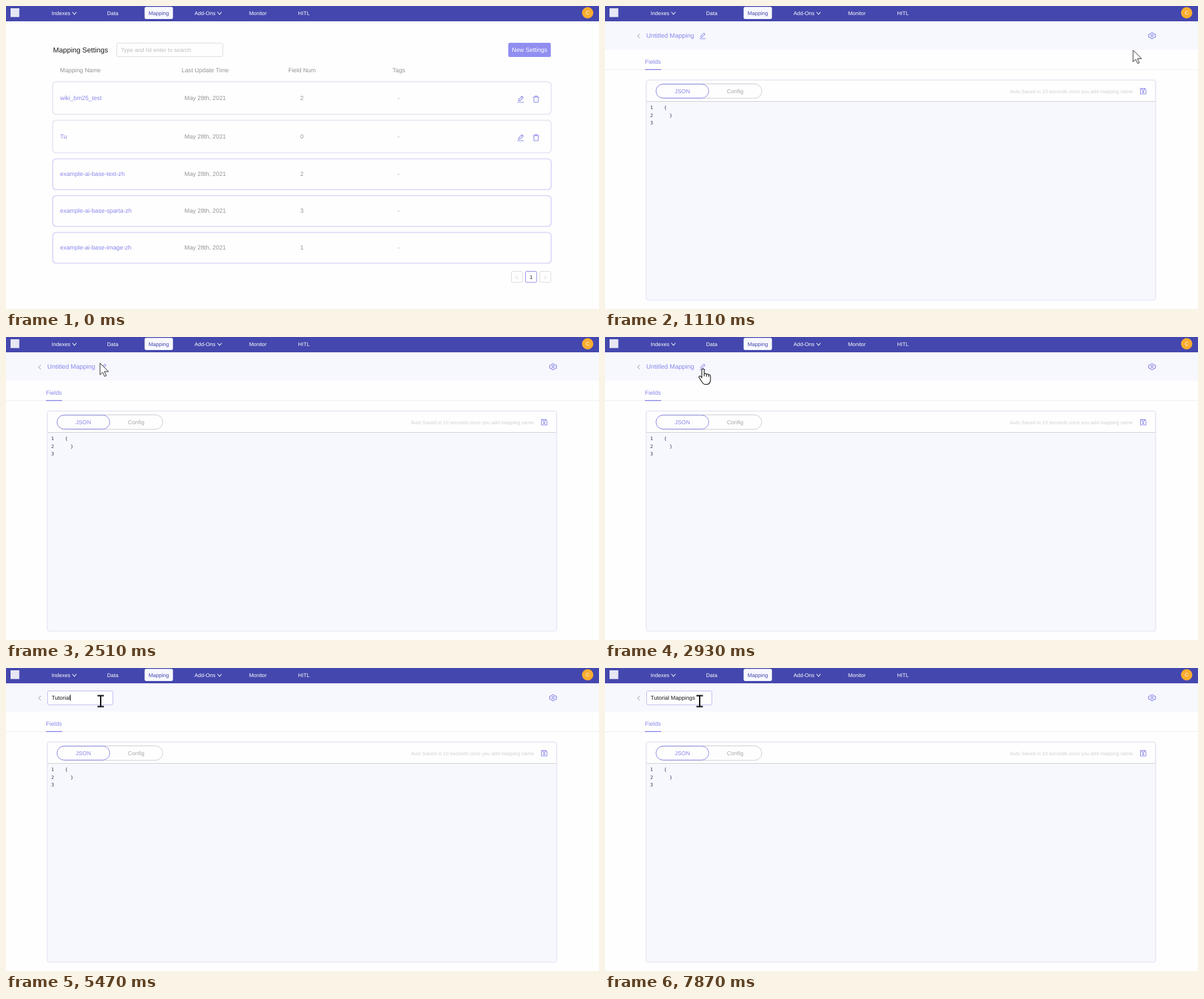
Write an HTML page that moves like this. It is 1046 by 535 pixels and loops after 8000 ms.

```html
<!DOCTYPE html>
<html lang="en">
<head>
<meta charset="utf-8">
<title>Mapping settings</title>
<style>
html, body { margin: 0; width: 100%; height: 100%; overflow: hidden; background: #fefefe; }
svg { display: block; width: 1046px; height: 535px; }
text { font: 10.62px "Liberation Sans", Arial, sans-serif; text-rendering: geometricPrecision; fill: #949494; }
.nav text { font-size: 9.4px; fill: #fff; }
.nav .on { fill: #4447ad; }
.link { fill: #8986ea; }
.ink { fill: #1c1c1c; }
.code text { font: 8.2px "DejaVu Sans Mono", monospace; fill: #33335c; }
.line { fill: none; stroke: #8481e6; stroke-width: 1.1; stroke-linejoin: round; stroke-linecap: round; }
.card { fill: #fefefe; stroke: #cbc9f8; stroke-width: 1.2; }
.card.soft { stroke: #e0e0ee; }
.box { fill: #fefefe; stroke: #d9d9d9; }

/* 80 ms is one percent */
#list, #edit, #title, #field, #button, #arrow, #hand, #beam { animation: 8s step-end infinite; }
#list { animation-name: list; }
#edit { animation-name: edit; }
#title { animation-name: title; }
#field { animation-name: field; }
#button { animation-name: hover; }
#arrow { animation-name: arrow; }
#hand { animation-name: hand; }
#beam { animation-name: beam; }
#cursor { animation: move 8s linear infinite; }
@keyframes list { 0% { visibility: visible } 13.125%, 100% { visibility: hidden } }
@keyframes edit { 0% { visibility: hidden } 13.125%, 100% { visibility: visible } }
@keyframes title { 0% { visibility: hidden } 13.125% { visibility: visible } 39.125%, 100% { visibility: hidden } }
@keyframes field { 0% { visibility: hidden } 39.125%, 100% { visibility: visible } }
@keyframes hover { 0% { fill: #918ef1 } 8.875%, 100% { fill: #9e9bf6 } }
@keyframes arrow {
  0% { visibility: hidden } 2.375% { visibility: visible } 8.875% { visibility: hidden }
  13.125% { visibility: visible } 33.125%, 100% { visibility: hidden }
}
@keyframes hand {
  0% { visibility: hidden } 8.875% { visibility: visible } 13.125% { visibility: hidden }
  33.125% { visibility: visible } 39.125%, 100% { visibility: hidden }
}
@keyframes beam { 0% { visibility: hidden } 39.125%, 100% { visibility: visible } }
@keyframes move {
  0%, 2.375% { transform: translate(1036px, 418px) }
  5% { transform: translate(996px, 200px) }
  7.5% { transform: translate(955px, 59px) }
  10.5%, 14.5% { transform: translate(931.5px, 78px) }
  16% { transform: translate(840px, 81px) }
  18.5% { transform: translate(520px, 84px) }
  21.25% { transform: translate(224.5px, 79.5px) }
  23%, 27.2% { transform: translate(166px, 60px) }
  28.875%, 30.6% { transform: translate(157px, 55px) }
  32.2% { transform: translate(175px, 37px) }
  34.875% { transform: translate(173px, 53px) }
  36.625%, 39.1% { transform: translate(173px, 56px) }
  41.25% { transform: translate(170px, 48px) }
  44.25%, 100% { transform: translate(167px, 58.5px) }
}
</style>
</head>
<body>
<svg viewBox="0 0 1046 535">
  <defs>
    <g id="pencil" class="line">
      <path d="M.5 11.5H11M2 9l.4-2.6L8 .8l2.2 2.2-5.6 5.6z"/>
    </g>
    <g id="trash" class="line">
      <path d="M.3 2.5h10.4M3.5 2.3V.6h4v1.7M1.5 2.7l.4 8.8h7.2l.4-8.8"/>
    </g>
    <path id="down" d="M0 0l3.7 4.4L7.4 0" fill="none" stroke="#fff" stroke-width="1.1"/>
    <filter id="glow" x="-2%" y="-15%" width="104%" height="130%">
      <feDropShadow dx="0" dy="0" stdDeviation="1.2" flood-color="#8481e6" flood-opacity=".22"/>
    </filter>
  </defs>

  <rect width="1046" height="535" fill="#fefefe"/>
  <g class="nav">
    <rect width="1046" height="27" fill="#4447ad"/>
    <rect x="8" y="4" width="15.5" height="15.5" fill="#e6e6f5"/>
    <rect x="244.5" y="1.5" width="50" height="21.5" rx="3" fill="#f7f8fe"/>
    <text x="80.5" y="16">Indexes</text><use href="#down" x="117" y="10.5"/>
    <text x="178.3" y="16">Data</text>
    <text x="251.5" y="16" class="on">Mapping</text>
    <text x="332.5" y="16">Add-Ons</text><use href="#down" x="373" y="10.5"/>
    <text x="428.7" y="16">Monitor</text>
    <text x="515.3" y="16">HITL</text>
    <circle cx="1026" cy="12" r="10" fill="#fbad2f"/>
    <text x="1026" y="15.2" text-anchor="middle" style="font-size:9px">C</text>
  </g>

  <g id="list">
    <text x="83" y="81.5" class="ink" style="font-size:12.55px">Mapping Settings</text>
    <rect class="box" x="195.5" y="65.5" width="187" height="24" rx="2"/>
    <text x="202.8" y="81" style="font-size:9.97px;fill:#bdbdbd">Type and hit enter to search</text>
    <rect id="button" x="886" y="65" width="75" height="25" rx="2.5"/>
    <text x="923.5" y="80.8" text-anchor="middle" style="fill:#fff">New Settings</text>
    <text x="95.3" y="117">Mapping Name</text>
    <text x="309.8" y="117">Last Update Time</text>
    <text x="498" y="117">Field Num</text>
    <text x="681.7" y="117">Tags</text>
    <g id="rows"></g>
    <rect class="box" x="891.5" y="468.5" width="19.5" height="19.5" rx="2"/>
    <rect class="box" x="916.5" y="468.5" width="19.5" height="19.5" rx="2" style="stroke:#8481e6"/>
    <rect class="box" x="941.5" y="468.5" width="19.5" height="19.5" rx="2"/>
    <path d="M903 477l-4 2.6 4 2.6M949.300 477l4 2.6-4 2.6" fill="none" stroke="#d2d2d2" stroke-width=".9"/>
    <text x="926.2" y="481.700" text-anchor="middle" class="ink" style="font-size:9px">1</text>
  </g>

  <g id="edit">
    <rect y="27" width="1046" height="50" fill="#f7f8fe"/>
    <path d="M61.500 49.500l-4.300 3.700 4.300 3.700" fill="none" stroke="#8c8c9c"/>
    <g id="title">
      <text x="72.800" y="56.200" class="link" style="font-size:11.260px">Untitled Mapping</text>
      <use href="#pencil" transform="translate(167 47) scale(.93)"/>
    </g>
    <g class="line" transform="translate(965 52.500)">
      <path d="M-1.500-5.300h3l.6 1.600 1.300.7 1.700-.3 1.300 2.200L5.200 0l1.200 1.100-1.300 2.200-1.700-.3-1.300.7-.6 1.600h-3l-.6-1.600-1.300-.7-1.700.3-1.300-2.200L-5.200 0l-1.200-1.100 1.300-2.200 1.700.3 1.300-.7z"/>
      <circle r="1.900"/>
    </g>
    <path d="M0 112.500H1046" stroke="#ececf0"/>
    <text x="70.500" y="102" class="link" style="font-size:10.520px">Fields</text>
    <rect x="70.500" y="111.500" width="28.500" height="1.500" fill="#8481e6"/>

    <rect x="73" y="131" width="898" height="388" rx="4" class="card soft" filter="url(#glow)"/>
    <path d="M73.500 169H970.500V515a3.500 3.500 0 0 1-3.500 3.500H77a3.500 3.500 0 0 1-3.500-3.500z" fill="#f7f8fe"/>
    <path d="M73.500 168.500H970.500" stroke="#cbcbcf"/>
    <rect x="90" y="137.500" width="186.500" height="25.500" rx="12.750" class="box" style="stroke:#c6c6cc"/>
    <rect x="90" y="138" width="93" height="24.500" rx="12.250" class="box" style="stroke:#8481e6"/>
    <text x="136.500" y="154" text-anchor="middle" class="link" style="font-size:10.050px">JSON</text>
    <text x="229.500" y="154" text-anchor="middle" style="font-size:10.050px;fill:#a6a6a6">Config</text>
    <text x="714.200" y="153.500" style="font-size:8.750px;fill:#d0d0d3">Auto Saved in 10 seconds once you add mapping name</text>
    <g class="line" transform="translate(944.500 145.500)">
      <path d="M0 0H7.500L9.700 2.200V9.700H0zM2.600.2V3H6.700V.2"/>
      <circle cx="4.800" cy="6.300" r="1.300"/>
    </g>
    <g class="code">
      <text x="79.800" y="182">1</text><text x="104" y="182">{</text>
      <text x="79.800" y="195.500">2</text><text x="113.800" y="195.500">}</text>
      <text x="79.800" y="209">3</text>
    </g>
  </g>

  <g id="field">
    <rect x="73.500" y="40.500" width="115" height="24.500" rx="2" fill="#fff" stroke="#b5b3f2"/>
    <text id="typed" x="80.500" y="56" class="ink" style="font-size:9.940px"></text>
    <rect id="caret" y="47" width="1" height="11" fill="#222"/>
  </g>

  <g id="cursor" stroke="#111" stroke-linejoin="round">
    <path id="arrow" fill="#fff" d="M0 0V20.500l4.600-4.300 3.500 7.300 3-1.400-3.400-7.200h7.300z"/>
    <g id="hand" stroke-width="1.200">
      <path fill="#fff" d="M-2.200 16V2.200a2.100 2.100 0 0 1 4.200 0V9.500c.3-1.600 3.700-1.600 4 .6.500-1.400 3.500-1 3.800 1 .6-1 3.200-.6 3.200 1.600V19c0 5.500-2.500 8.700-6.500 8.700H4c-3 0-4.500-2-6-4.500-1.400-2.400-3-4.700-4.700-7.200-1.600-2.600 1.200-4.200 2.900-2z"/>
      <path fill="none" d="M2 9.500v4M6 10.500v3.500M9.800 11.500V14.500"/>
    </g>
    <path id="beam" fill="none" stroke="#000" stroke-width="2.200" d="M-5.700-9.700H5.700M-5.700 9.700H5.700M0-9.700V9.700"/>
  </g>
</svg>
<script>
const $ = id => document.getElementById(id);

// name, field count, card top, card height, editable
const rows = [
  ['wiki_bm25_test', 2, 134, 57, true],
  ['Tu', 0, 202, 57, true],
  ['example-ai-base-text-zh', 2, 270, 54],
  ['example-ai-base-sparta-zh', 3, 335, 54],
  ['example-ai-base-image-zh', 1, 400, 54],
];
$('rows').innerHTML = rows.map(([name, count, top, height, editable]) => {
  const y = top + (editable ? 32 : 30);
  const icons = `<use href="#pencil" x="902" y="${top + 24.5}"/><use href="#trash" x="929.5" y="${top + 24.5}"/>`;
  return `<rect class="card ${editable ? 'soft' : ''}" x="82.5" y="${top}" width="879" height="${height}" rx="6" filter="url(#glow)"/>
    <text class="link" x="95.5" y="${y}">${name}</text>
    <text x="314.8" y="${y}">May 28th, 2021</text>
    <text x="519" y="${y}">${count}</text>
    <text x="690.5" y="${y}">-</text>${editable ? icons : ''}`;
}).join('');

const phrase = 'Tutorial\u00a0Mappings';
const keys = [4280, 4470, 4740, 4870, 5140, 5250, 5360, 5470, 5950,
  6350, 6550, 6690, 6870, 7010, 7075, 7140, 7290];
const typed = $('typed'), caret = $('caret');
let start;

function draw(now) {
  start ??= now;
  const t = (now - start) % 8000;
  const text = phrase.slice(0, keys.filter(k => k <= t).length);
  if (typed.textContent !== text) typed.textContent = text;
  caret.setAttribute('x', 80.3 + (text ? typed.getComputedTextLength() : 0));
  caret.setAttribute('opacity', t < 4000 || (t >= 4280 && t < 7870) ? 1 : 0);
  requestAnimationFrame(draw);
}
requestAnimationFrame(draw);
</script>
</body>
</html>
```
